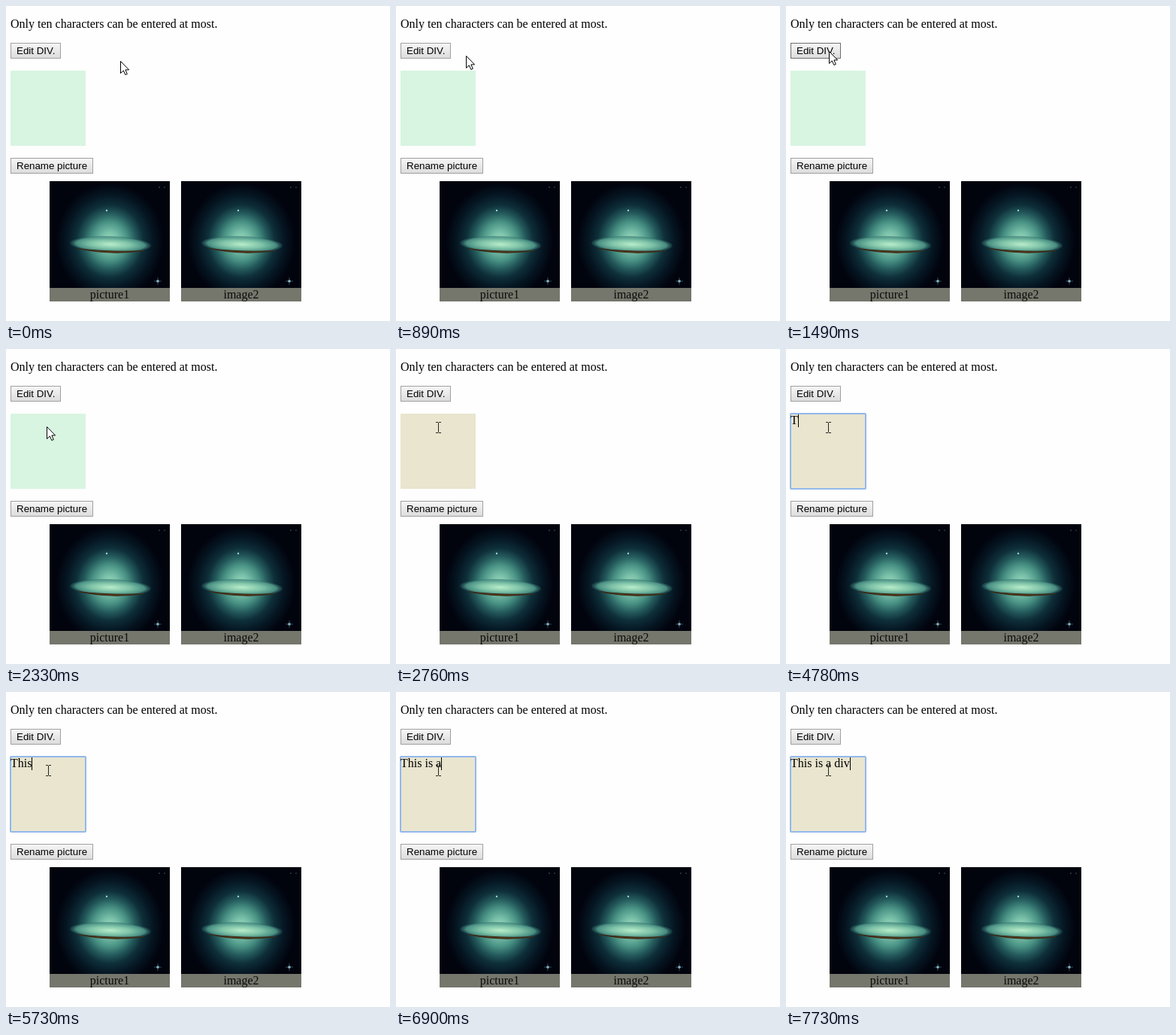
An HTML page that plays this animation: 511x419 px, repeating every 8000 ms.

```html
<!DOCTYPE html>
<html lang="en">
<head>
<meta charset="utf-8">
<title>Editable box</title>
<style>
  html, body { margin: 0; width: 100%; height: 100%; overflow: hidden; background: #fefefe; }
  svg { display: block; width: 100%; height: 100%; }
  text { font: 16px "Liberation Serif", serif; white-space: pre; }
  .button text { font: 13.333px "Liberation Sans", sans-serif; }
  .button rect { fill: url(#face); stroke: #a0a0a0; }
  .button.hover rect { stroke: #6e6e6e; }
  .caption { text-anchor: middle; fill: #0c0c0a; }
</style>
</head>
<body>
<svg viewBox="0 0 511 419">
  <defs>
    <linearGradient id="face" x2="0" y2="1">
      <stop stop-color="#f6f6f6"/><stop offset="1" stop-color="#dcdcdc"/>
    </linearGradient>
    <radialGradient id="glow">
      <stop stop-color="#a5dfc2"/>
      <stop offset=".17" stop-color="#76bea7"/>
      <stop offset=".34" stop-color="#478f82"/>
      <stop offset=".48" stop-color="#245a5c"/>
      <stop offset=".62" stop-color="#0e2f39"/>
      <stop offset=".8" stop-color="#051622"/>
      <stop offset="1" stop-color="#01030d"/>
    </radialGradient>
    <radialGradient id="disc">
      <stop stop-color="#b9edca"/>
      <stop offset=".5" stop-color="#7fc3a8"/>
      <stop offset=".85" stop-color="#4f9688" stop-opacity=".9"/>
      <stop offset="1" stop-color="#27595b" stop-opacity=".3"/>
    </radialGradient>
    <g id="galaxy">
      <rect width="160" height="160" fill="#01030d"/>
      <ellipse cx="80" cy="80" rx="72" ry="78" fill="url(#glow)"/>
      <g transform="rotate(2 80 85)">
        <ellipse cx="81" cy="84" rx="54" ry="11" fill="url(#disc)"/>
        <path d="M38 91Q80 99 126 91Q80 95 38 91Z" fill="#5b3a18" stroke="#3a2a18"/>
      </g>
      <g fill="#9fd0d4">
        <circle cx="76" cy="39" r="1.2"/>
        <circle cx="144" cy="133" r="1.8"/>
        <path d="M139 133h10M144 128v10" stroke="#5d8ca0" stroke-width=".5"/>
        <circle cx="146" cy="8" r=".6"/>
        <circle cx="153" cy="8" r=".5"/>
      </g>
      <rect y="142" width="160" height="18" fill="#75766c"/>
    </g>
  </defs>

  <rect width="511" height="419" fill="#fefefe"/>
  <text x="6" y="29">Only ten characters can be entered at most.</text>
  <g class="button" id="edit">
    <rect x="6.5" y="49.5" width="66" height="20"/><text x="14" y="64">Edit DIV.</text>
  </g>
  <g class="button">
    <rect x="6.5" y="202.5" width="109" height="20"/><text x="14" y="217">Rename picture</text>
  </g>
  <use href="#galaxy" x="58" y="233"/><text class="caption" x="138" y="389">picture1</text>
  <use href="#galaxy" x="233" y="233"/><text class="caption" x="313" y="389">image2</text>

  <rect id="box" x="6" y="86" width="100" height="100"/>
  <rect id="ring" x="6" y="86" width="100" height="100" rx="1" fill="none" stroke="#92b8ec" stroke-width="2"/>
  <text id="typed" x="6" y="100"></text>
  <rect id="caret" y="87" width="1" height="17"/>
  <path id="arrow" d="M.5.5V16.5L4.3 12.9L6.8 18.5L9.3 17.5L6.9 11.9H11.6Z" fill="#fff" stroke="#000"/>
  <path id="beam" d="M53 97.5h3M57 97.5h3M56.5 98v13M53 111.5h3M57 111.5h3" fill="none" stroke="#222"/>
</svg>
<script>
const LOOP = 8000;
const EDITABLE = 2760, FOCUS = 3230;

// [time, x, y] of the arrow tip
const pointer = [
  [0, 152, 73], [500, 146, 73], [620, 135, 73], [770, 112, 70], [890, 93, 66],
  [1040, 80, 64], [1190, 65, 61], [1350, 58, 60], [1490, 57, 60],
  [2210, 56, 82], [2330, 54, 103]
];
// [time, number of characters typed]
const sentence = "This is a div";
const typing = [
  [0, 0], [4780, 1], [5360, 2], [5610, 3], [5730, 4], [6190, 5], [6470, 7],
  [6620, 8], [6900, 9], [7170, 10], [7450, 11], [7600, 12], [7730, 13]
];

const [edit, box, ring, typed, caret, arrow, beam] =
  ["edit", "box", "ring", "typed", "caret", "arrow", "beam"].map(id => document.getElementById(id));
const latest = (steps, t) => steps.findLast(([start]) => start <= t);
const within = (t, from, to) => t >= from && t < to;
const show = (node, visible) => node.setAttribute("visibility", visible ? "visible" : "hidden");

function draw(t) {
  const [, x, y] = latest(pointer, t);
  arrow.setAttribute("transform", `translate(${x} ${y})`);
  edit.classList.toggle("hover", within(t, 1190, 2210));
  box.setAttribute("fill", t < EDITABLE ? "#d8f5e1" : "#e9e5ce");
  show(arrow, t < EDITABLE);
  show(beam, t >= EDITABLE);
  show(ring, t >= FOCUS);

  typed.textContent = sentence.slice(0, latest(typing, t)[1]);
  const width = typed.textContent ? typed.getComputedTextLength() : 0;
  caret.setAttribute("x", 6 + Math.round(width));
  show(caret, t >= FOCUS && !within(t, 3790, 4370) && !within(t, 5210, 5360));
}

const begin = performance.now();
function tick() {
  draw((performance.now() - begin) % LOOP);
  requestAnimationFrame(tick);
}
tick();
</script>
</body>
</html>
```
